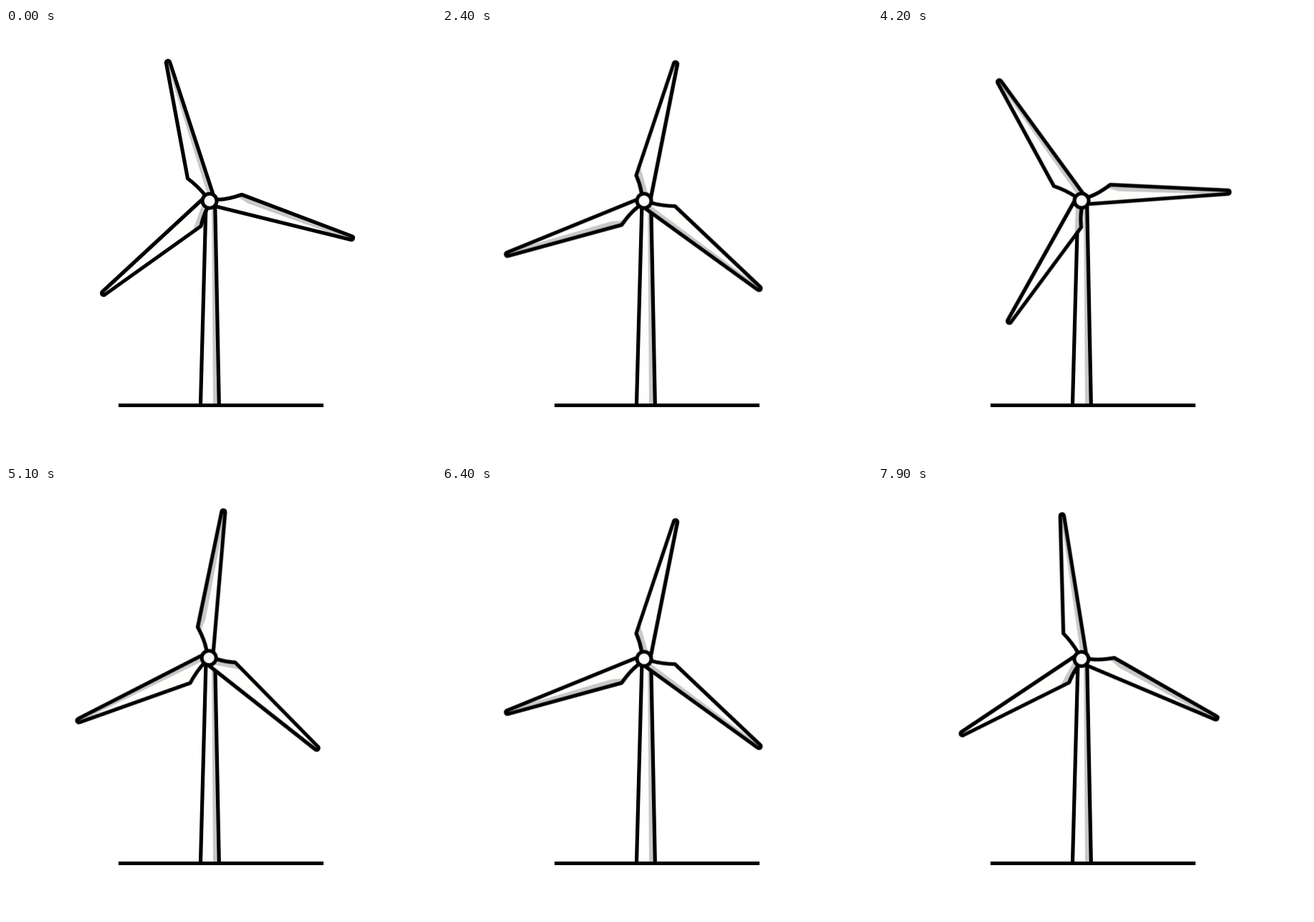
Recreate the animation shown at these times as an HTML page. Size 600 by 600 pixels, loop 8 s.

```html
<!DOCTYPE html>
<html lang="en">
<head>
<meta charset="utf-8">
<title>Wind turbine</title>
<style>
  html, body { margin: 0; width: 100%; height: 100%; overflow: hidden; background: #fff; }
  svg { display: block; width: 100vw; height: 100vh; }
  .body { fill: #fefffc; }
  .shade { fill: #c8c8c8; }
  .line { fill: none; stroke: #000; stroke-width: 5.2; stroke-linejoin: round; stroke-linecap: round; }
  .rotor { transform-origin: 283px 240.9px; animation: spin 4s steps(40, end) infinite; }
  @keyframes spin { to { transform: rotate(-360deg); } }
</style>
</head>
<body>
<svg viewBox="0 0 600 600">
  <defs>
    <path id="up" d="M278 233.5Q267 220 253.5 210L223.5 49A2.6 2.6 0 0 1 228.6 47.5L289 232Z"/>
    <path id="right" d="M293 239Q304 241 329 232.5L482.8 290.6A2.5 2.5 0 0 1 481.5 295.4L292 248.7Z"/>
    <path id="left" d="M274 239L134.5 368A2.6 2.6 0 0 0 138 372L272 276.5Q275 263 280.5 252Z"/>
  </defs>

  <!-- tower and ground -->
  <path class="body" d="M279 246L271.5 525H297.3L291.7 246Z"/>
  <path class="shade" d="M287 246L289 525H297.3L291.7 246Z"/>
  <path class="line" d="M279 246L271.5 525M291.7 246L297.3 525"/>
  <path d="M157 526.5H443" stroke="#000" stroke-width="5"/>

  <g class="rotor">
    <use href="#up" class="body"/>
    <path class="shade" d="M224.5 50L228.6 47.5L289 232L280 229Z"/>
    <use href="#up" class="line"/>

    <use href="#right" class="body"/>
    <path class="shade" d="M322 235L329 232.5L482.8 290.6L481.5 295.4L465 290.5L338 245Z"/>
    <use href="#right" class="line"/>

    <use href="#left" class="body"/>
    <path class="shade" d="M260 284.5L272 276.5Q275 263 280.5 252L273 248Z"/>
    <use href="#left" class="line"/>

    <circle cx="284" cy="241.2" r="10" fill="#fafafa" stroke="#000" stroke-width="5"/>
  </g>
</svg>
</body>
</html>
```
